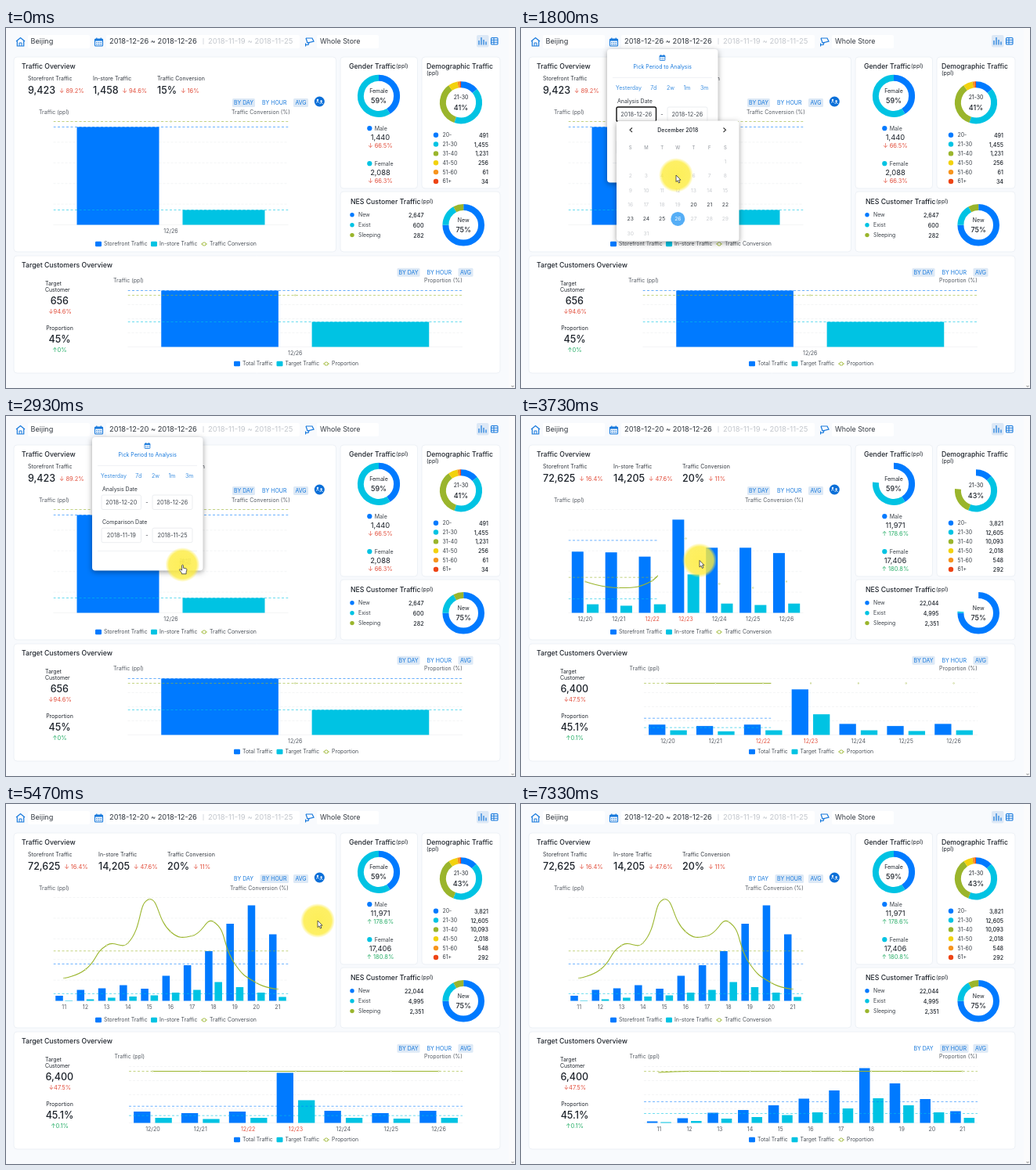
An HTML page with a canvas for the animation above (7.53 s loop, 650 by 460 pixels).

```html
<!DOCTYPE html>
<html lang="en">
<head>
<meta charset="utf-8">
<title>Traffic dashboard</title>
<style>
html, body { margin: 0; width: 100%; height: 100%; overflow: hidden; background: #f8fafd; }
canvas { display: block; width: 650px; height: 460px; }
</style>
</head>
<body>
<canvas id="stage"></canvas>
<script>
const LOOP = 7530;
const OPEN = 780, CALENDAR = 1500, PICK = 2120, PICKED = 2440, CONFIRM = 3350, TOP_HOUR = 4450, LOW_HOUR = 6030;
const BLUE = '#007aff', CYAN = '#00c3e3', OLIVE = '#9ab52c', INK = '#1d232b', LINK = '#1678dc';
const RED = '#e2503e', GREEN = '#27ae68';
const PALETTE = [BLUE, CYAN, OLIVE, '#f2d20d', '#f7941d', '#ee4415'];

const canvas = document.getElementById('stage');
const c = canvas.getContext('2d');
const dpr = window.devicePixelRatio || 1;
canvas.width = 650 * dpr;
canvas.height = 460 * dpr;

const clamp = (v, low = 0, high = 1) => Math.max(low, Math.min(high, v));
const easeOut = (p, power) => 1 - (1 - p) ** power;
const mean = list => list.reduce((a, b) => a + b, 0) / list.length;

// y is the middle of the capital letters
function text(s, x, y, size = 6.9, color = INK, align = 'left', weight = 400) {
  c.font = `${weight} ${size}px Inter, "Noto Sans CJK TC", sans-serif`;
  c.textAlign = align;
  c.fillStyle = color;
  c.fillText(s, x, y + size * 0.36);
  return c.measureText(s).width;
}

function box(x, y, w, h, r, fill, stroke, width = 1) {
  c.beginPath();
  c.roundRect(x, y, w, h, r);
  if (fill) { c.fillStyle = fill; c.fill(); }
  if (stroke) { c.strokeStyle = stroke; c.lineWidth = width; c.stroke(); }
}

function dot(x, y, r, fill) {
  c.beginPath();
  c.arc(x, y, r, 0, 7);
  c.fillStyle = fill;
  c.fill();
}

function line(points, color, width = 1, dash = []) {
  c.beginPath();
  points.forEach(([x, y]) => c.lineTo(x, y));
  c.strokeStyle = color;
  c.lineWidth = width;
  c.setLineDash(dash);
  c.stroke();
  c.setLineDash([]);
}

function shadowBox(x, y, w, h) {
  c.save();
  c.shadowColor = 'rgba(0,0,0,.38)';
  c.shadowBlur = 7 * dpr;
  c.shadowOffsetY = 2 * dpr;
  box(x, y, w, h, 4, '#fff');
  c.restore();
}

// Data: bar and line heights in pixels
const dates = Array.from({ length: 7 }, (_, i) => '12/' + (20 + i));
const hours = Array.from({ length: 11 }, (_, i) => String(11 + i));
const topCharts = {
  single: { labels: ['12/26'], bars: [[125], [19]], curve: [132] },
  day: {
    labels: dates,
    bars: [[86, 85, 79, 131, 91.5, 91.5, 84], [12, 10, 12, 54, 13, 11, 13]],
    curve: [40, 32, 41, 95, 37, 32, 40]
  },
  hour: {
    labels: hours,
    bars: [[6.5, 14, 16, 20, 15.5, 32, 45.5, 63.5, 98.5, 122, 85], [.5, 2, 4, 5.5, 7, 10.5, 14, 24, 17.5, 10.5, 5]],
    curve: [29, 40, 71, 74, 130, 88, 83, 101, 47, 23, 15]
  }
};
const lowCharts = {
  single: { labels: ['12/26'], bars: [[72], [32]], curve: [66] },
  day: {
    labels: dates,
    bars: [[14.5, 12.5, 14.5, 64, 15.5, 12.5, 15.5], [6.5, 5, 6.5, 29, 6.5, 5.5, 6.5]],
    curve: Array(7).fill(66)
  },
  hour: {
    labels: hours,
    bars: [[2, 6, 13, 16.5, 22.5, 31, 41.5, 70, 50.5, 30.5, 15], [1, 2.5, 5.5, 7.5, 10, 13.5, 18.5, 31.5, 22.5, 13.5, 6.5]],
    curve: [64.5, ...Array(10).fill(66)]
  }
};
const before = {
  kpiX: [28, 111, 193],
  kpi: [['9,423', '↓ 89.2%'], ['1,458', '↓ 94.6%'], ['15%', '↓ 16%']],
  gender: [['1,440', '↓ 66.5%'], ['2,088', '↓ 66.3%']],
  ages: [491, 1455, 1231, 256, 61, 34], ageShare: '41%',
  nes: [2647, 600, 282],
  target: ['656', '↓94.6%', '45%', '↑0%']
};
const after = {
  kpiX: [28, 118, 206],
  kpi: [['72,625', '↓ 16.4%'], ['14,205', '↓ 47.6%'], ['20%', '↓ 11%']],
  gender: [['11,971', '↑ 178.6%'], ['17,406', '↑ 180.8%']],
  ages: [3821, 12605, 10093, 2018, 548, 292], ageShare: '43%',
  nes: [22044, 4995, 2351],
  target: ['6,400', '↓47.5%', '45.1%', '↑0.1%']
};

const delta = (s, x, y, align) => text(s, x, y, 7.5, s[0] === '↓' ? RED : GREEN, align);

// Handles follow the neighbours' direction and stay inside the data's range
function smoothCurve(points) {
  const ys = points.map(p => p[1]), low = Math.min(...ys), high = Math.max(...ys);
  const length = (p, q) => Math.hypot(q[0] - p[0], q[1] - p[1]);
  const handle = (i, side) => {
    const p = points[i], prev = points[i - 1], next = points[i + 1];
    if (!prev || !next) return p;
    const a = length(prev, p), b = length(p, next);
    const k = side * .5 * (side > 0 ? b : a) / (a + b);
    return [p[0] + (next[0] - prev[0]) * k, clamp(p[1] + (next[1] - prev[1]) * k, low, high)];
  };
  c.beginPath();
  c.moveTo(...points[0]);
  for (let i = 1; i < points.length; i++) c.bezierCurveTo(...handle(i - 1, 1), ...handle(i, -1), ...points[i]);
  c.strokeStyle = OLIVE;
  c.lineWidth = 1.1;
  c.stroke();
}

function chart(x0, x1, top, base, rows, data, p) {
  const band = (x1 - x0) / data.labels.length;
  const grow = easeOut(p, 5);
  for (let i = 0; i <= rows; i++) {
    const y = base + (top - base) * i / rows;
    line([[x0, y], [x1, y]], '#f0f1f3', .7, i ? [3, 2] : []);
  }
  data.bars.forEach((bar, s) => bar.forEach((h, i) => {
    c.fillStyle = PALETTE[s];
    c.fillRect(x0 + band * (i + .1 + s * .45), base, band * .35, -h * grow);
  }));
  const points = data.curve.map((h, i) => [x0 + band * (i + .5), base - h]);
  c.save();
  c.beginPath();
  c.rect(x0, top - 10, (x1 - x0) * p, base - top + 20);
  c.clip();
  [...data.bars, data.curve].forEach((list, s) => {
    const y = base - mean(list);
    c.globalAlpha = .65;
    line([[x0, y], [x1, y]], PALETTE[s], .9, [3, 2.5]);
  });
  c.globalAlpha = 1;
  smoothCurve(points);
  c.restore();
  points.forEach(([x, y]) => {
    dot(x, y, 1.1, '#b5c76a');
    dot(x, y, .5, '#fff');
  });
  data.labels.forEach((s, i) => {
    const weekend = s === '12/22' || s === '12/23';
    text(s, x0 + band * (i + .5), base + 8, 7.1, weekend ? RED : '#555b63', 'center');
  });
}

function legend(y, items) {
  items.forEach(([x, s], i) => {
    if (i < 2) box(x, y - 3.2, 8, 6.4, 1.2, PALETTE[i]);
    else {
      line([[x, y], [x + 8, y]], OLIVE, .8);
      dot(x + 4, y, 2.5, OLIVE);
      dot(x + 4, y, 1.8, '#fff');
    }
    text(s, x + 11, y, 6.9, '#4a5058');
  });
}

// The whole ring is uncovered clockwise
function donut(x, y, r, values, p, label, share) {
  const total = mean(values) * values.length, start = -Math.PI / 2;
  const end = start + Math.PI * 2 * easeOut(p, 3);
  let from = start;
  values.forEach((v, i) => {
    const to = from + Math.PI * 2 * v / total;
    if (from < end) {
      c.beginPath();
      c.arc(x, y, r - 4, from, Math.min(to, end));
      c.strokeStyle = PALETTE[i];
      c.lineWidth = 8;
      c.stroke();
    }
    from = to;
  });
  text(label, x, y - 6.5, 6.9, INK, 'center');
  text(share, x, y + 6, 9, INK, 'center', 500);
}

function list(names, values, dotX, labelX, valueX, y, step, r) {
  names.forEach((s, i) => {
    dot(dotX, y + step * i, r, PALETTE[i]);
    text(s, labelX, y + step * i, 6.9, '#3a4048');
    text(values[i].toLocaleString('en-US'), valueX, y + step * i + .5, 7.1, INK, 'right', 500);
  });
}

function buttons(dx, dy, hourly) {
  const items = [['BY DAY', 289, 29, !hourly], ['BY HOUR', 324.5, 36.5, hourly], ['AVG', 367, 19, true]];
  items.forEach(([s, x, w, on]) => {
    if (on) box(x + dx, 90 + dy, w, 11, 1.5, '#dde9f6');
    text(s, x + w / 2 + dx, 95.7 + dy, 7, LINK, 'center');
  });
}

function calendarIcon(x, y, s) {
  box(x - s / 2, y - s * .4, s, s * .9, s * .1, null, LINK, s * .11);
  c.fillStyle = LINK;
  c.fillRect(x - s / 2, y - s * .4, s, s * .25);
  for (const i of [-1, 1]) line([[x + i * s * .27, y - s * .56], [x + i * s * .27, y - s * .3]], LINK, s * .12);
  for (let i = 0; i < 6; i++) c.fillRect(x - s * .32 + (i % 3) * s * .26, y + (i > 2 ? s * .24 : 0), s * .13, s * .13);
}

function header(period) {
  [[28, 79], [128, 247], [397, 79]].forEach(([x, w]) => box(x, 9, w, 17, 2, '#fff'));
  line([[13, 17], [18.5, 12.5], [24, 17]], LINK, 1.2);
  line([[14.3, 16.5], [14.3, 23], [22.7, 23], [22.7, 16.5]], LINK, 1.2);
  line([[17, 23], [17, 19], [20, 19], [20, 23]], LINK, 1);
  text('Beijing', 31.5, 17, 9.1, '#333941');
  calendarIcon(118.5, 18, 10);
  text(period, 132, 17, 9.3, '#30363e');
  line([[252, 13], [252, 21]], '#ccd1d8', .8);
  text('2018-11-19 ~ 2018-11-25', 258, 17, 9.5, '#c3c7cd');
  // camera
  line([[383, 13], [391, 13], [393, 17], [385, 19], [383, 13]], LINK, 1.2);
  line([[387, 18.5], [386, 21.5], [383, 21.5]], LINK, 1.2);
  line([[382.6, 19.5], [382.6, 23.5]], LINK, 1.2);
  text('Whole Store', 401, 17, 8.9, '#333941');
  box(601, 9, 15.5, 15.5, 2, '#dce8f6');
  [[604, 16], [607, 12], [610, 15], [613, 17.5]].forEach(([x, y]) => line([[x, 21.5], [x, y]], LINK, 1.2));
  box(619.5, 12.5, 8.5, 8.5, 1, null, LINK, 1.1);
  line([[619.5, 15.3], [628, 15.3]], LINK);
  line([[619.5, 18.2], [628, 18.2]], LINK);
  line([[623, 12.5], [623, 21]], LINK);
}

function dashboard(t) {
  const changed = t >= CONFIRM, data = changed ? after : before;
  const p = changed ? clamp((t - CONFIRM) / 1000) : 1;
  const progress = start => t >= start ? clamp((t - start) / 1000) : p;
  const view = start => t >= start ? 'hour' : changed ? 'day' : 'single';
  const title = (s, x, y) => text(s, x, y, 8.7, INK, 'left', 500);

  [[10, 37, 411.5, 249], [427, 37, 98.5, 168], [531, 37, 100, 168], [427, 209, 204, 77], [10, 291, 621, 150]]
    .forEach(([x, y, w, h]) => box(x, y, w, h, 4, '#fff', '#edf1f6', 1));

  title('Traffic Overview', 20, 48.5);
  ['Storefront Traffic', 'In-store Traffic', 'Traffic Conversion'].forEach((s, i) => {
    const x = data.kpiX[i];
    text(s, x, 64.7, 7, '#30363e');
    const w = text(data.kpi[i][0], x, 79, 12.5, INK, 'left', 500);
    delta(data.kpi[i][1], x + w + 5, 80);
  });
  buttons(0, 0, t >= TOP_HOUR);
  dot(400.3, 94, 6.5, '#0b6fd8');
  for (const [x, y] of [[398, 92], [402.6, 93.5]]) {
    dot(x, y, 1.2, '#fff');
    line([[x - 1.8, y + 3.4], [x, y + 1.6], [x + 1.8, y + 3.4]], '#fff', 1);
  }
  text('Traffic (ppl)', 42, 107.2, 7, '#555b63');
  text('Traffic Conversion (%)', changed ? 286 : 288, 107.2, 7, '#555b63');
  chart(60.5, 360.5, 119.5, 251.5, 5, topCharts[view(TOP_HOUR)], progress(TOP_HOUR));
  legend(276, [[114, 'Storefront Traffic'], [185, 'In-store Traffic'], [249, 'Traffic Conversion']]);

  title('Gender Traffic', 438, 48.5);
  text('(ppl)', 498, 48.7, 7.1);
  donut(476, 86.8, 27.1, [41, 59], p, 'Female', '59%');
  ['Male', 'Female'].forEach((s, i) => {
    const y = 128.5 + i * 45;
    dot(464.3, y - .3, 3.1, PALETTE[i]);
    text(s, 470.8, y, 7, '#3a4048');
    text(data.gender[i][0], 478, y + 11, 9.4, INK, 'center');
    delta(data.gender[i][1], 478, y + 21.5, 'center');
  });

  title('Demographic Traffic', 537, 48.5);
  text('(ppl)', 537, 57.2, 7.1);
  donut(581, 95.3, 27.1, data.ages, p, '21-30', data.ageShare);
  list(['20-', '21-30', '31-40', '41-50', '51-60', '61+'], data.ages, 549, 557.5, 616, 136.7, 11.85, 3.2);

  title('NES Customer Traffic', 440, 221.5);
  text('(ppl)', 530, 221.7, 7.1);
  donut(584.2, 251.8, 26.8, data.nes, p, 'New', '75%');
  list(['New', 'Exist', 'Sleeping'], data.nes, 442, 450, 533.5, 238.8, 12.9, 2.7);

  title('Target Customers Overview', 20, 302.5);
  text('Target', 50, 327);
  text('Customer', 50, 334.5);
  text(data.target[0], 68.3, 348.3, 12.5, INK, 'center', 500);
  delta(data.target[1], 69, 362.5, 'center');
  text('Proportion', 68.5, 383.2, 7, INK, 'center');
  text(data.target[2], 68.5, 397.8, 12.5, INK, 'center', 500);
  delta(data.target[3], 68.5, 411.5, 'center');
  buttons(210.5, 216.7, t >= LOW_HOUR);
  text('Traffic (ppl)', changed ? 138.5 : 137, 322, 7, '#555b63');
  text('Proportion (%)', 534, 322, 7, '#555b63');
  chart(changed ? 157 : 155.5, 583, 335.5, 407.5, 4, lowCharts[view(LOW_HOUR)], progress(LOW_HOUR));
  legend(429, [[291, 'Total Traffic'], [345.5, 'Target Traffic'], [405, 'Proportion']]);
}

function popup(t) {
  const editing = t >= CALENDAR && t < PICKED;
  const pressed = t >= 2800;
  shadowBox(110, 27, 141.5, 170.5);
  calendarIcon(180.5, 38, 7);
  text('Pick Period to Analysis', 180.7, 50, 6.9, LINK, 'center');
  line([[117, 63.5], [244, 63.5]], '#eceff3', .8);
  [['Yesterday', 121], ['7d', 165.3], ['2w', 186], ['1m', 207.5], ['3m', 229]].forEach(([s, x]) => text(s, x, 76, 7, '#3d8fe0'));
  const start = t >= PICKED ? '2018-12-20' : '2018-12-26';
  [['Analysis Date', 93.5, start, '2018-12-26'], ['Comparison Date', 135.7, '2018-11-19', '2018-11-25']]
    .forEach(([label, y, from, to], row) => {
      text(label, 123, y, 7, '#30363e');
      box(122, y + 7.5, 50.5, 18.5, 2, '#fff', editing && !row ? '#111' : '#e6e9ed', editing && !row ? 1.4 : .8);
      box(187, y + 7.5, 51, 18.5, 2, '#fff', '#e6e9ed', .8);
      text(from, 147.3, y + 17, 7.4, '#444a52', 'center');
      text('-', 180, y + 17, 7.4, '#444a52', 'center');
      text(to, 212.5, y + 17, 7.4, '#444a52', 'center');
    });
  line([[117, 172.5], [244, 172.5]], '#eceff3', .8);
  text('確認', 229, 186, 7.6, pressed ? '#a9b4bd' : LINK, 'center');
  if (editing) calendar(t >= PICK ? 20 : 26);
}

function calendar(selected) {
  shadowBox(122, 118.5, 156.5, 154);
  line([[142, 127.5], [139, 130.3], [142, 133]], '#333', 1.1);
  line([[258.5, 127.5], [261.5, 130.3], [258.5, 133]], '#333', 1.1);
  text('December 2018', 200.3, 131, 6.9, INK, 'center', 500);
  const column = i => 139.7 + 20.2 * i;
  [...'SMTWTFS'].forEach((s, i) => text(s, column(i), 152.5, 6, '#8c9198', 'center'));
  for (let day = 1; day <= 31; day++) {
    const cell = day + 5, x = column(cell % 7), y = 170.5 + 18.35 * Math.floor(cell / 7);
    if (day === selected) dot(x, y, 9, '#55aef6');
    const color = day === selected ? '#fff' : day >= 20 && day <= 26 ? '#333940' : '#c9ccd0';
    text(day, x, y, 6.7, color, 'center');
  }
}

// Pointer stops: time, x, y. It is a hand while it rests.
const stops = [
  [130, 219, -30], [750, 219, 27], [1150, 219, 27], [1430, 147, 110], [1540, 147, 110],
  [1800, 198, 188], [2020, 220, 225], [2150, 220, 225], [2330, 200, 243], [2530, 200, 243],
  [2830, 225.5, 190], [3400, 225.5, 190], [3730, 228, 184.5], [4350, 342, 96], [4980, 342, 96],
  [5470, 398, 149], [5900, 553, 312], [6180, 553, 312], [7050, 680, 60]
];

function pointer(t) {
  const i = stops.findIndex(s => s[0] > t);
  if (i < 1) return;
  const [t0, x0, y0] = stops[i - 1], [t1, x1, y1] = stops[i];
  const p = (t - t0) / (t1 - t0), e = p * p * (3 - 2 * p);
  const x = x0 + (x1 - x0) * e, y = y0 + (y1 - y0) * e;
  const glow = c.createRadialGradient(x, y, 0, x, y, 22);
  glow.addColorStop(0, 'rgba(253,236,62,.86)');
  glow.addColorStop(.8, 'rgba(253,236,62,.8)');
  glow.addColorStop(1, 'rgba(253,236,62,0)');
  dot(x, y, 22, glow);
  const hand = x0 === x1 && y0 === y1;
  const shape = new Path2D(hand
    ? 'M-.9 .8Q0 -.4 .9 .8V4.2L4.6 5Q5.6 5.4 5.4 6.6L4.6 9.6V11.8H-1.2V10.4L-4 6.8Q-4 5.4 -2.7 5.8L-.9 7.2Z'
    : 'M0 0V8.6L2 6.8L3.4 10L4.9 9.3L3.5 6.2H6Z');
  c.save();
  c.translate(x, y);
  c.lineJoin = 'round';
  c.lineWidth = .8;
  c.strokeStyle = '#333';
  c.fillStyle = '#fff';
  c.fill(shape);
  c.stroke(shape);
  c.restore();
}

function draw(now) {
  const t = now % LOOP;
  c.setTransform(dpr, 0, 0, dpr, 0, 0);
  c.fillStyle = '#f8fafd';
  c.fillRect(0, 0, 650, 460);
  c.fillStyle = '#fbfbfc';
  c.fillRect(642, 0, 8, 460);
  line([[645.5, 457], [647, 458.5], [648.5, 457]], '#777', 1);
  header(t >= PICKED ? '2018-12-20 ~ 2018-12-26' : '2018-12-26 ~ 2018-12-26');
  dashboard(t);
  if (t >= OPEN && t < CONFIRM) popup(t);
  pointer(t);
  requestAnimationFrame(draw);
}
requestAnimationFrame(draw);
</script>
</body>
</html>
```
